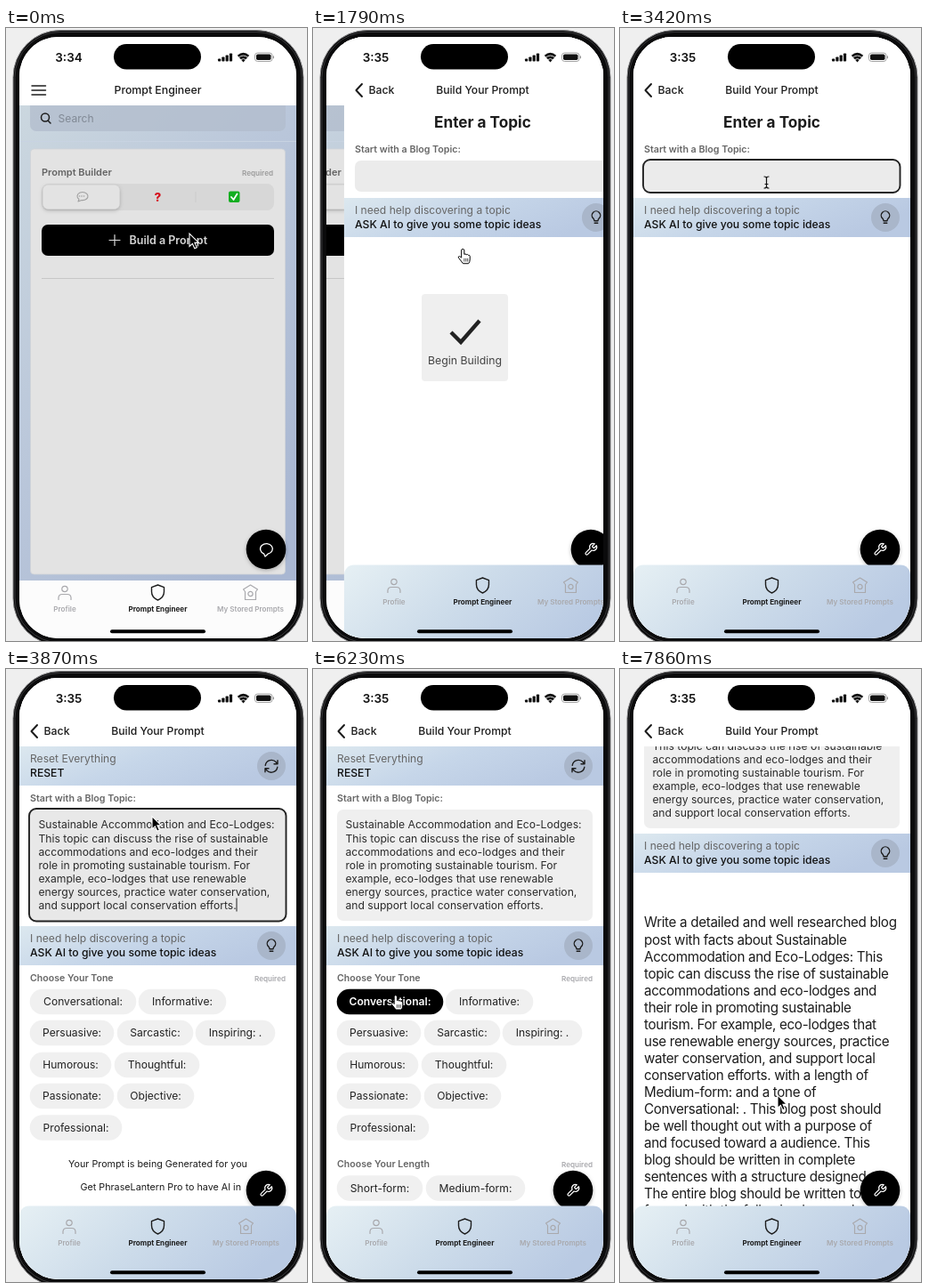
An HTML page that plays this animation: 338x689 px, repeating every 8000 ms.

```html
<!DOCTYPE html>
<html lang="en">
<head>
<meta charset="utf-8">
<title>Prompt builder</title>
<style>
  html, body { margin: 0; width: 100%; height: 100%; overflow: hidden; background: #efefef; }
  svg { display: block; width: 338px; height: 689px; font-family: Inter, sans-serif; }
  .line { fill: none; stroke-linecap: round; stroke-linejoin: round; }
  #article { letter-spacing: -.02em; }
</style>
</head>
<body>
<svg id="stage" viewBox="0 0 338 689"></svg>
<script>
const LOOP = 8000, STEP = 148;
const GREY = '#666', INK = '#1c1c1c', PALE = '#a9a9ad';

// y is the optical middle of the capitals
const text = (x, y, s, size, { w = 400, fill = INK, anchor = 'start' } = {}) =>
  `<text x="${x}" y="${(y + size * .36).toFixed(2)}" font-size="${size}" font-weight="${w}" fill="${fill}" text-anchor="${anchor}">${s}</text>`;
const mid = (x, y, s, size, o = {}) => text(x, y, s, size, { ...o, anchor: 'middle' });
const rect = (x1, y1, x2, y2, fill, r = 0, extra = '') =>
  `<rect x="${x1}" y="${y1}" width="${x2 - x1}" height="${y2 - y1}" rx="${r}" fill="${fill}" ${extra}/>`;
const line = (d, color, width = 1.3, extra = '') =>
  `<path class="line" d="${d}" stroke="${color}" stroke-width="${width}" ${extra}/>`;
const group = (id, ...parts) => `<g id="${id}">${parts.join('')}</g>`;
const at = (x, y, s, scale = 1) => `<g transform="translate(${x} ${y}) scale(${scale})">${s}</g>`;
const paragraph = (x, y, gap, lines, size, fill) =>
  lines.map((s, i) => text(x, y + i * gap, s, size, { fill })).join('');
const gradient = (id, stops, dir = 'x2="1" y2=".35"') =>
  `<linearGradient id="${id}" ${dir}>${stops.map((c, i) =>
    `<stop offset="${i / (stops.length - 1)}" stop-color="${c}"/>`).join('')}</linearGradient>`;

const icons = {
  person: c => `<circle class="line" cy="-4" r="3.2" stroke="${c}" stroke-width="1.2"/>` +
    line('M-7 8V5.500Q-6.500 2 -3 2H3Q6.500 2 7 5.500V8', c, 1.2),
  shield: c => line('M0-8.500 L7-5.800V-1Q7 5.500 0 8.500Q-7 5.500-7-1V-5.800Z', c, 1.4),
  store: c => line('M-8-3.500L0-8.500L8-3.500L6-1V8H-6V-1Z', c, 1.2) +
    `<circle class="line" cy="1.500" r="2.600" stroke="${c}" stroke-width="1.2"/>`,
  bulb: line('M-2 3.500Q-2 2-3.400.5A4.700 4.700 0 1 1 3.400.5Q2 2 2 3.500ZM-1.800 6H1.800', INK, 1.4),
  refresh: line('M-6.800-1A7 7 0 0 1 5.500-4.300L7-2.500M7-6.500V-2.500H3M6.800 1A7 7 0 0 1-5.500 4.300L-7 2.500M-7 6.500V2.500H-3', INK, 1.4),
  wrench: at(-8, -8, line('M14.700 6.300a1 1 0 0 0 0 1.400l1.600 1.600a1 1 0 0 0 1.400 0l3.770-3.770a6 6 0 0 1-7.940 7.940l-6.910 6.910a2.120 2.120 0 0 1-3-3l6.910-6.910a6 6 0 0 1 7.940-7.940z', '#fff', 1.8), .67),
  bubble: line('M-2.500 4.800A6.900 5.900 0 1 1 2 5.200L-1 8Z', '#fff', 1.3),
};

const tabs = (xs, y) => [['Profile', 'person'], ['Prompt Engineer', 'shield'], ['My Stored Prompts', 'store']]
  .map(([name, icon], i) => {
    const c = i === 1 ? INK : PALE;
    return at(xs[i], y, icons[icon](c)) + mid(xs[i], y + 18.500, name, 8.100, { w: i === 1 ? 700 : 600, fill: c });
  }).join('');
const fab = icon => `<circle cx="292" cy="586" r="22.300" fill="#000" filter="url(#shadow)"/>` + at(292, 586, icon);
const banner = (y, top, bottom, icon) => rect(15, y, 326, y + 44, 'url(#tint)') +
  text(27, y + 14, top, 12.100, { fill: GREY }) +
  text(27, y + 30, bottom, 12.200, { w: 500, fill: '#111' }) +
  `<circle cx="298" cy="${y + 22}" r="16" fill="#a9b6ca"/>` + at(298, y + 22.300, icon);
const helpBanner = y => banner(y, 'I need help discovering a topic', 'ASK AI to give you some topic ideas', icons.bulb);
const chip = (x1, x2, y, s, on) => rect(x1 - .3, y - 14.300, x2 + .3, y + 14.300, on ? '#000' : '#f0f0f0', 14.300) +
  mid((x1 + x2) / 2, y, s, 12.100, on ? { w: 600, fill: '#fff' } : { fill: '#222' });
const heading = (y, s) => text(27, y, s, 10.600, { w: 600, fill: GREY }) +
  text(314, y + 1, 'Required', 8.100, { w: 600, fill: PALE, anchor: 'end' });
const topicLabel = y => text(27, y, 'Start with a Blog Topic:', 10.700, { w: 600, fill: GREY });
const ring = (id, y1, y2) => rect(26, y1, 314.500, y2, 'none', 8, `id="${id}" stroke="#222" stroke-width="1.900"`);

const homePage = group('home',
  rect(15, 87, 326, 621, 'url(#sky)'),
  rect(15, 127, 326, 128, '#c8d3e2'),
  rect(27, 80, 314, 116, '#b2bdcc', 7, 'opacity=".75"'),
  line('M47 104L50 107M48.500 100.500a4.500 4.500 0 1 1-9 0a4.500 4.500 0 1 1 9 0', INK, 1.5),
  text(58.500, 102, 'Search', 12.100, { fill: '#818995' }),
  rect(15, 0, 326, 87, '#fff'),
  line('M29 65H44.500M29 70H44.500M29 75H44.500', INK, 1.5),
  mid(170.500, 70, 'Prompt Engineer', 12.300, { w: 500 }),
  rect(27.500, 136, 313.500, 614, '#e3e3e3', 4, 'stroke="#cfd2d7" stroke-width=".8"'),
  text(40, 162, 'Prompt Builder', 11, { w: 600, fill: '#646464' }),
  text(300, 163, 'Required', 8.100, { w: 600, fill: '#9b9b9b', anchor: 'end' }),
  rect(40, 175, 301, 205, '#d7d7d7', 8),
  rect(41.500, 176.500, 127.500, 203.500, '#e3e3e3', 6, 'filter="url(#shadow)"'),
  rect(212.500, 184, 213.500, 196, '#cbcbcb'),
  line('M81 195L82 192.500A6 4.600 0 1 1 85 193.600Z', '#a0a0a0', 1.1),
  [82.500, 85, 87.500].map(x => `<circle cx="${x}" cy="189" r=".8" fill="#a0a0a0"/>`).join(''),
  mid(170.500, 190, '?', 13.500, { w: 800, fill: '#d5121e' }),
  rect(250, 183.500, 262.500, 196, '#12ae20', 2),
  line('M253 190L255.500 193L259.500 186.500', '#fff', 1.7),
  rect(40, 221, 301, 256, '#000', 7),
  group('plus', line('M-6 0H6M0-6V6', '#ddd', 1.2)),
  group('label', text(138.500, 238.500, 'Build a Prompt', 12.500, { w: 600, fill: '#d6d6d6' })),
  rect(40, 281, 301, 282, '#c7c7c7'),
  rect(15, 621, 326, 689, '#fcfcfc'),
  tabs([66, 170.500, 274.500], 634.500),
  fab(icons.bubble));

const topic = ['Sustainable Accommodation and Eco-Lodges:', 'This topic can discuss the rise of sustainable',
  'accommodations and eco-lodges and their', 'role in promoting sustainable tourism. For',
  'example, eco-lodges that use renewable', 'energy sources, practice water conservation,',
  'and support local conservation efforts.'];

const article = ['Write a detailed and well researched blog', 'post with facts about Sustainable',
  'Accommodation and Eco-Lodges: This', 'topic can discuss the rise of sustainable',
  'accommodations and eco-lodges and', 'their role in promoting sustainable',
  'tourism. For example, eco-lodges that', 'use renewable energy sources, practice',
  'water conservation, and support local', 'conservation efforts. with a length of',
  'Medium-form: and a tone of', 'Conversational: . This blog post should',
  'be well thought out with a purpose of', 'and focused toward a audience. This',
  'blog should be written in complete', 'sentences with a structure designed',
  'The entire blog should be written to', 'for and with the following keyword'];

const emptyForm = group('empty',
  mid(170.500, 106, 'Enter a Topic', 17.200, { w: 700 }),
  topicLabel(136),
  rect(27, 149, 314, 184, '#ebebeb', 7),
  ring('emptyRing', 148, 185),
  helpBanner(191));

const filledForm = group('filled',
  banner(87, 'Reset Everything', 'RESET', icons.refresh),
  topicLabel(145),
  rect(27, 158, 314, 283, '#efefef', 7, 'id="field"'),
  paragraph(36.500, 175, 15.170, topic, 12.150, '#2b2b2b'),
  rect(258.500, 257.500, 259.500, 272.500, INK, 0, 'id="caret"'),
  ring('topicRing', 157, 283.500),
  helpBanner(289),
  group('choices',
    heading(347, 'Choose Your Tone'),
    chip(27, 146, 374, 'Conversational:'), chip(149, 247, 374, 'Informative:'),
    chip(27, 121, 409, 'Persuasive:'), chip(125, 210, 409, 'Sarcastic:'), chip(213, 302, 409, 'Inspiring: .'),
    chip(27, 118, 445, 'Humorous:'), chip(122, 217, 445, 'Thoughtful:'),
    chip(27, 121, 480, 'Passionate:'), chip(125, 211, 480, 'Objective:'),
    chip(27, 130, 515.500, 'Professional:'),
    group('tonePick', chip(27, 146, 374, 'Conversational:', true)),
    group('lengths',
      heading(556.500, 'Choose Your Length'),
      chip(27, 123, 583.500, 'Short-form:'), chip(127, 238, 583.500, 'Medium-form:'),
      chip(27, 120, 619, 'Long-form:'), chip(123, 212, 619, 'Microblog:'), chip(216, 288, 619, 'Listicle:'),
      group('lengthPick', chip(127, 238, 583.500, 'Medium-form:', true))),
    group('notice',
      mid(170.500, 556, 'Your Prompt is being Generated for you', 10.750),
      text(83.500, 582, 'Get PhraseLantern Pro to have AI in', 10.750))),
  group('article', paragraph(27, 389, 19.060, article, 15.200, INK)));

const formPage = group('form',
  rect(15, 0, 326, 689, '#fff'),
  emptyForm, filledForm,
  rect(15, 0, 326, 87, '#fff'),
  line('M35 63L28.500 70L35 77', INK, 2),
  text(42.500, 70, 'Back', 12.300, { w: 500 }),
  mid(170.500, 70, 'Build Your Prompt', 12.200, { w: 500 }),
  fab(icons.wrench),
  rect(15, 603.500, 326, 700, 'url(#bar)', 11),
  tabs([71, 170.500, 269.500], 626.500));

const toast = group('toast',
  rect(122, 299, 219, 397, 'rgba(228,228,228,.6)', 4),
  `<path d="M155 342L166 353L187 329" fill="none" stroke="#222" stroke-width="4.300"/>`,
  mid(170.500, 374, 'Begin Building', 12.300, { fill: '#444' }));

const statusBar =
  `<text id="clock" x="70.500" y="38" font-size="13.500" font-weight="600" text-anchor="middle" fill="#111"></text>` +
  rect(121, 18, 219, 46.500, '#000', 14.250) +
  [0, 1, 2, 3].map(i => rect(238 + i * 4.300, 34.500 - i * 2, 241.200 + i * 4.300, 37.500, '#111', .8)).join('') +
  `<path d="M266.500 38.500L259.800 30.700Q266.500 25 273.200 30.700Z" fill="#111"/>` +
  line('M261.500 33Q266.500 28.900 271.500 33M263.600 35.600Q266.500 33.200 269.400 35.600', '#fff', .8) +
  rect(279.500, 28, 299, 37.500, 'none', 3, 'stroke="#999" stroke-width=".9"') +
  rect(281, 29.500, 297.500, 36, '#111', 1.7) + rect(299.800, 31.200, 301, 34.300, '#999', .6);

const pointers = {
  arrow: `<path d="M0 0V14.500L3.400 11.400L5.800 16.700L8.300 15.600L5.900 10.400H10.400Z" fill="#000" stroke="#fff" stroke-width="1.100"/>`,
  hand: `<path d="M4.200 10.500V2.300a1.600 1.600 0 0 1 3.200 0V6.600q1.400-1 2.300.4q1.500-.9 2.300.6q1.800-.4 1.800 1.400v3.200q0 3-1.600 4.800H6Q4.500 14.800 1 10.600q-.8-1.700 1-1.700q1 0 2.200 1.600z" fill="#fff" stroke="#000"/>` +
    line('M7.400 11.500v3M9.400 11.500v3M11.300 11.500v3', '#000', .7),
  beam: line('M-2.500-6.500Q0-6.500 0-4.500Q0-6.500 2.500-6.500M0-5V5M-2.500 6.500Q0 6.500 0 4.500Q0 6.500 2.500 6.500M-1.500 2H1.500', '#111', 1.2),
};

document.getElementById('stage').innerHTML = `<defs>
  ${gradient('tint', ['#dce8ef', '#c6d6e9', '#b9c9e2'])}
  ${gradient('bar', ['#e6f0f4', '#cddcea', '#b9cae3'])}
  ${gradient('sky', ['#cbd7df', '#b9c6da', '#a9b7d2'], 'x2=".8" y2="1"')}
  <filter id="shadow" x="-30%" y="-30%" width="160%" height="160%"><feDropShadow dx="0" dy="1.500" stdDeviation="2" flood-opacity=".25"/></filter>
  <clipPath id="glass">${rect(15, 10, 326, 686, '#fff', 44)}</clipPath></defs>` +
  rect(0, 0, 338, 689, '#efefef') +
  rect(8, 2.500, 334, 694, '#0b0b0c', 53, 'stroke="#8b8b8d" stroke-width="1"') +
  rect(10, 4.500, 332, 691, 'none', 51, 'stroke="#38383a" stroke-width="1"') +
  `<g clip-path="url(#glass)">${rect(15, 0, 326, 689, '#fff')}${homePage}${formPage}${toast}${statusBar}` +
  rect(117, 676.200, 224, 680.200, '#000', 2) + '</g>' +
  group('pointer', ...Object.entries(pointers).map(([id, s]) => group(id, s)));

const $ = id => document.getElementById(id);
const show = (id, on) => $(id).style.display = on ? '' : 'none';
const move = (id, x, y) => $(id).setAttribute('transform', `translate(${x} ${y})`);
const fade = (id, a) => $(id).setAttribute('opacity', a);
const ramp = (k, from, to) => Math.min(1, Math.max(0, (k - from) / (to - from)));

// step, x, y, pointer shape
const route = [
  [0, 206, 231, 'arrow'], [1, 199, 236, 'hand'], [2, 195, 239, 'hand'], [4, 195, 239, 'hand'],
  [8, 157, 250, 'hand'], [9, 157, 250, 'hand'], [10, 158, 247, 'hand'], [13, 164, 248, 'arrow'],
  [15, 164, 248, 'arrow'], [18, 164.500, 173.500, 'beam'], [25, 164.500, 173.500, 'beam'],
  [26, 164, 165.500, 'arrow'], [34, 164, 165.500, 'arrow'], [41, 87, 366, 'hand'], [47, 87, 366, 'hand'],
  [50, 173, 480, 'hand'], [52, 173, 480, 'hand'], [53, 177, 479, 'arrow'], [99, 177, 479, 'arrow']];

function drawPointer(k) {
  const i = route.findIndex(p => p[0] > k), [k0, x0, y0, shape] = route[i - 1], [k1, x1, y1] = route[i];
  const p = ramp(k, k0, k1), e = p * p * (3 - 2 * p);
  move('pointer', x0 + (x1 - x0) * e, y0 + (y1 - y0) * e);
  for (const id in pointers) show(id, id === shape);
}

function draw(t) {
  const k = Math.floor(t / STEP + .1);          // the picture advances in fixed steps
  const push = 1 - (1 - ramp(k, 10, 13)) ** 2.500;
  $('clock').textContent = k < 11 ? '3:34' : '3:35';

  move('home', -93 * push, 0);
  move('form', 311 * (1 - push), 0);
  show('form', k > 10);
  show('home', k < 13);
  show('label', k < 10);
  move('plus', k < 10 ? 122 : 157, 238.500);
  fade('toast', k < 10 ? 0 : k === 10 ? .72 : 1 - ramp(k, 18, 22));

  show('empty', k < 26);
  show('emptyRing', k >= 21);
  show('filled', k >= 26);
  move('filled', 0, -104 * ramp(k, 44, 46));
  fade('topicRing', k < 41 ? 1 : k === 41 ? .5 : 0);
  $('field').setAttribute('fill', k < 42 ? '#e8e8e8' : '#efefef');
  show('caret', k < 29 || (k >= 33 && k < 41));

  const toned = k >= 42;
  show('tonePick', toned);
  show('lengths', toned);
  move('notice', 0, toned ? 104 : 0);
  show('lengthPick', k >= 52);
  show('choices', k < 53);
  show('article', k >= 53);
  drawPointer(k);
}

const start = performance.now();
function tick() {
  draw((performance.now() - start) % LOOP);
  requestAnimationFrame(tick);
}
tick();
</script>
</body>
</html>
```
